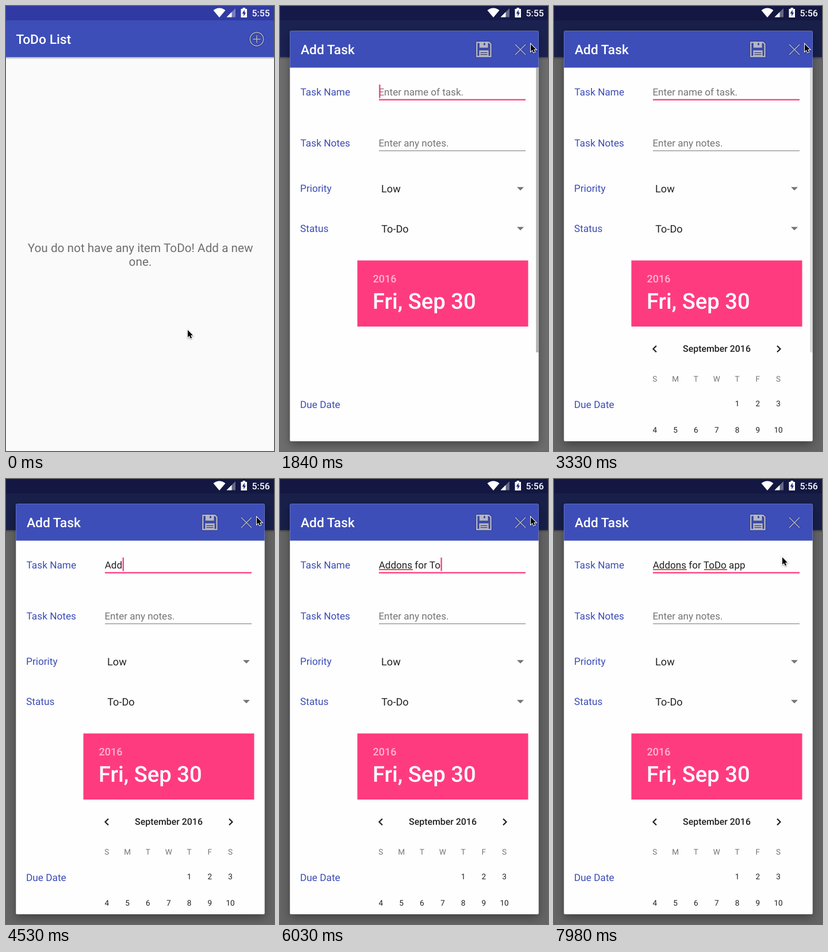
An HTML page for the animation above (8 s loop, 466x776 px).

```html
<!DOCTYPE html>
<html lang="en">
<head>
<meta charset="utf-8">
<title>Task list</title>
<style>
  html, body { margin: 0; width: 100%; height: 100%; overflow: hidden; }
  svg { display: block; width: 466px; height: 776px; }
  text { font: 17.1px Roboto, sans-serif; text-rendering: geometricPrecision; white-space: pre; }
  .title { font-size: 22.8px; font-weight: 500; fill: #fff; }
  .clock, .month { font-size: 15.9px; font-weight: 500; }
  .message { font-size: 20.75px; fill: #6f6f6f; text-anchor: middle; }
  .label { fill: #3c4cb6; }
  .label text { font-size: 17.25px; }
  .hint { fill: #757575; }
  .value { font-size: 18.1px; }
  .value, .typed, .month, .days { fill: #212121; }
  .month, .days text, .weekdays text { text-anchor: middle; }
  .days text, .weekdays text { font-size: 13.6px; }
  .weekdays { fill: #757575; }
  .icon { fill: none; stroke: #b4b6c6; stroke-width: 1.5; filter: drop-shadow(0 0 .8px #1c2350); }
  .pink { fill: #ff3b7f; }
  .spell { fill: #f44336; }
</style>
</head>
<body>
<svg viewBox="0 0 466 776">
  <defs>
    <linearGradient id="fade" x2="0" y2="1">
      <stop stop-color="#000" stop-opacity=".32"/>
      <stop offset="1" stop-color="#000" stop-opacity="0"/>
    </linearGradient>
    <filter id="shadow" x="-10%" y="-10%" width="120%" height="120%">
      <feDropShadow dx="0" dy="6" stdDeviation="8" flood-opacity=".35"/>
    </filter>
  </defs>

  <rect width="466" height="776" fill="#fafafa"/>
  <rect width="466" height="25" fill="#303aa2"/>
  <rect y="25" width="466" height="64" fill="#3d4eb8"/>
  <rect y="89" width="466" height="4" fill="url(#fade)"/>
  <text class="title" x="17.6" y="66">ToDo List</text>
  <g class="icon">
    <circle cx="436" cy="57.7" r="11.7"/>
    <path d="M429.5 57.7h13M436 51.2v13"/>
  </g>
  <text class="message" x="233.7" y="429.2">You do not have any item ToDo! Add a new</text>
  <text class="message" x="233.5" y="453.2">one.</text>

  <rect id="dim" width="466" height="776"/>

  <g fill="#fff">
    <path d="M371 20L360.5 7.5Q371-.5 381.5 7.5Z"/>
    <path d="M399 4V19.5H383.5Z" opacity=".35"/>
    <path d="M392.5 10.5V19.5H383.5Z"/>
    <path d="M408.5 5H411.5V3H416V5H419V20H408.5Z"/>
    <path d="M414.8 6.5L410.5 13.2H413.2V18L417.2 11.4H414.8Z" fill="#252d78"/>
    <text class="clock" id="clock" x="427.5" y="18"></text>
  </g>

  <g id="dialog">
    <rect x="17.3" y="43.4" width="432.4" height="715.6" rx="2" fill="#fefefe" filter="url(#shadow)"/>
    <path d="M17.3 107.4V45.4Q17.3 43.4 19.3 43.4H447.7Q449.7 43.4 449.7 45.4V107.4Z" fill="#3d4eb8"/>
    <text class="title" x="35.9" y="84">Add Task</text>
    <g class="icon">
      <path d="M342.3 63.5H363.5L366.5 66.5V88H342.3Z" stroke-width="2.4"/>
      <path d="M347.5 63V72H361V63H357.5V69H353.5V63ZM347 88V78H362V88Z" fill="#b4b6c6"/>
      <path d="M348.5 81.3H360.5M348.5 84.7H360.5" stroke="#3a4068" stroke-width="1.2"/>
      <path d="M409 67L427 85M427 67L409 85"/>
    </g>

    <g class="label">
      <text x="35.5" y="156">Task Name</text>
      <text x="35.5" y="245">Task Notes</text>
      <text x="35" y="324.2">Priority</text>
      <text x="35" y="394">Status</text>
      <text x="35" y="701">Due Date</text>
    </g>

    <text class="hint" id="nameHint" x="171.4" y="155.5">Enter name of task.</text>
    <text class="typed" id="name" x="171.7" y="155.5" xml:space="preserve"></text>
    <rect class="spell" id="spellFirst" x="172" y="157" width="59" height="2"/>
    <rect class="spell" id="spellSecond" x="261" y="157" width="40" height="2"/>
    <rect class="pink" x="172" y="162.3" width="255" height="2.3"/>
    <rect class="pink" id="caret" y="137" width="2.3" height="23.5"/>

    <text class="hint" x="171.4" y="244.5">Enter any notes.</text>
    <rect x="172" y="252" width="255" height="1" fill="#777"/>

    <text class="value" x="176.1" y="325">Low</text>
    <text class="value" x="176.2" y="395">To-Do</text>
    <path d="M412 315.7H424L418 321.7ZM412 385.2H424L418 391.2Z" fill="#757575"/>

    <rect class="pink" x="134.5" y="443.7" width="297" height="115.3"/>
    <text x="161.5" y="481.5" fill="#ffb8d0" style="font-size:18.1px;font-weight:500">2016</text>
    <text x="161" y="528" fill="#fff" style="font-size:38.2px;font-weight:500">Fri, Sep 30</text>

    <g id="calendar">
      <path d="M178 592.5L172.5 598L178 603.5M388 592.5L393.5 598L388 603.5" fill="none" stroke="#212121" stroke-width="2.2"/>
      <text class="month" x="283" y="603">September 2016</text>
      <g class="weekdays" id="weekdays"></g>
      <g class="days" id="days"></g>
    </g>
    <rect id="scrollbar" x="445.2" y="107.4" width="4.5" height="496.6" fill="#b2b2b2"/>
  </g>

  <path id="pointer" d="M0 0V12.8L2.9 10.1L5 14.7L7.1 13.7L5.1 9.2H9Z" stroke="#fff" stroke-width="2"
        paint-order="stroke" style="filter:drop-shadow(0 1px .8px #0006)"/>
</svg>

<script>
const LOOP = 8000;
const TASK = 'Addons for ToDo app';
const KEY_TIMES = [3930, 4080, 4530, 4680, 4830, 4980, 5130, 5280, 5430, 5580,
                   5730, 5880, 6030, 6330, 6630, 6780, 6930, 7230, 7380];
const MOVES = [
  { times: [500, 640, 790, 940, 1090, 1240, 1390, 1540], from: [316, 565], to: [436, 66.5] },
  { times: [7680, 7830, 7980], from: [436, 66.5], to: [397, 136.5] }
];

const el = id => document.getElementById(id);
const show = (id, visible) => el(id).style.display = visible ? '' : 'none';
const passed = (times, t) => times.filter(time => t >= time).length;
const ease = p => p * p * (3 - 2 * p);

function addCell(group, column, y, label) {
  const cell = document.createElementNS(el('days').namespaceURI, 'text');
  cell.setAttribute('x', 175.3 + column * 35.8);
  cell.setAttribute('y', y);
  cell.textContent = label;
  el(group).append(cell);
}

[...'SMTWTFS'].forEach((letter, i) => addCell('weekdays', i, 655, letter));
for (let day = 1; day <= 10; day++) {
  const slot = day + 3;
  addCell('days', slot % 7, slot < 7 ? 698 : 744, day);
}

function pointerAt(t) {
  const move = t < MOVES[1].times[0] ? MOVES[0] : MOVES[1];
  const p = ease(passed(move.times, t) / move.times.length);
  return move.from.map((start, i) => start + (move.to[i] - start) * p);
}

function render(t) {
  show('dialog', t >= 1840);
  show('calendar', t >= 1980);
  el('dim').setAttribute('opacity', t < 1840 ? 0 : t < 1980 ? 0.56 : 0.6);
  el('clock').textContent = t < 2430 ? '5:55' : '5:56';
  el('scrollbar').setAttribute('opacity', t < 3330 ? 1 : t < 3480 ? 0.45 : 0);

  const count = passed(KEY_TIMES, t);
  el('name').textContent = TASK.slice(0, count);
  show('nameHint', count === 0);
  show('spellFirst', count > 6);
  show('spellSecond', count > 15);

  const caretOn = t < 2280 || (t >= 2730 && t < 3180) || (t >= 3780 && t < 7830);
  show('caret', caretOn);
  const width = count ? el('name').getComputedTextLength() : 0;
  el('caret').setAttribute('x', 172.2 + width);

  el('pointer').setAttribute('transform', `translate(${pointerAt(t)})`);
}

const start = performance.now();
function tick() {
  render((performance.now() - start) % LOOP);
  requestAnimationFrame(tick);
}
tick();
</script>
</body>
</html>
```
